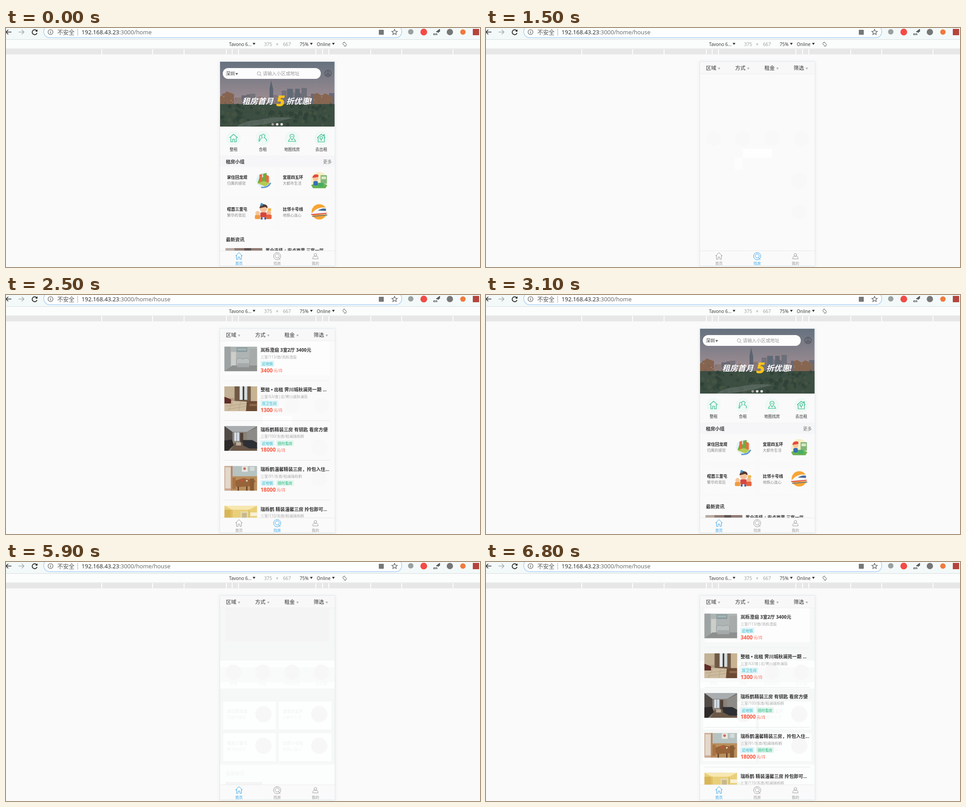
These frames come from a looping animation (1054x531 px, 8000 ms). An HTML page:

```html
<!DOCTYPE html>
<html lang="zh">
<head>
<meta charset="utf-8">
<style>
html, body { margin: 0; width: 100%; height: 100%; overflow: hidden; background: #fafafa; }
svg { display: block; width: 1054px; height: 531px; }
text { font-family: "Open Sans", "Noto Sans CJK SC", "Noto Sans CJK", sans-serif; white-space: pre; }
</style>
</head>
<body>
<svg id="stage" viewBox="0 0 1054 531" xmlns="http://www.w3.org/2000/svg"></svg>
<script>
const LOOP = 8000;
const GREEN = '#20b67f', BLUE = '#35a5ed', GREY = '#999';

const rect = (x, y, w, h, fill, extra = '') => `<rect x="${x}" y="${y}" width="${w}" height="${h}" fill="${fill}" ${extra}/>`;
const circle = (x, y, r, fill, extra = '') => `<circle cx="${x}" cy="${y}" r="${r}" fill="${fill}" ${extra}/>`;
const text = (x, y, size, fill, s, extra = '') => `<text x="${x}" y="${y}" font-size="${size}" fill="${fill}" ${extra}>${s}</text>`;
const line = (d, color, width = 1, extra = '') => `<path d="${d}" fill="none" stroke="${color}" stroke-width="${width}" ${extra}/>`;
const shape = (d, fill, extra = '') => `<path d="${d}" fill="${fill}" ${extra}/>`;
const group = (id, body, extra = '') => `<g id="${id}" ${extra}>${body}</g>`;
const down = (x, y, w, fill) => shape(`M${x} ${y}h${w}l${-w / 2} ${w * 0.8}z`, fill);
const BOLD = 'font-weight="700"', SEMI = 'font-weight="600"', MID = 'text-anchor="middle"';

function random(seed) {
  return () => (seed = (seed * 16807) % 2147483647) / 2147483647;
}

function browser() {
  let s = rect(0, 0, 1054, 25, '#f3f9f9') + rect(0, 25, 1054, 1, '#d9dcdd') + rect(0, 26, 1054, 20, '#fbfcfc');
  s += rect(84, -6, 796, 27.5, '#fdfefe', 'rx="13" stroke="#a9cff5" stroke-width="1.5"');
  s += line('M12 9H0M5 4L0 9L5 14', '#333', 1.7) + line('M28 9H40M35 4L40 9L35 14', '#a9adad', 1.6);
  s += line('M68 6A5.5 5.5 0 1 0 69 11', '#222', 1.8) + shape('M70 3v5h-5z', '#222');
  s += circle(99, 9, 5.5, 'none', 'stroke="#555" stroke-width="1.2"') + rect(98.4, 8, 1.3, 4, '#555') + rect(98.4, 5.7, 1.3, 1.3, '#555');
  s += text(114, 13.5, 12.8, '#555', '不安全') + rect(159, 2, 1, 15, '#aaa');
  s += '<text x="168" y="14" font-size="12.85" fill="#222">192.168.43.23<tspan fill="#666">:3000<tspan id="path"></tspan></tspan></text>';
  s += rect(829, 4, 11, 11, '#777', 'rx="1"');
  s += line('M864 3l1.8 4 4.3.4-3.2 2.9 1 4.2-3.9-2.3-3.9 2.3 1-4.2-3.2-2.9 4.3-.4z', '#555', 1.2);
  s += circle(900, 8.5, 6, '#9aa0a0') + circle(929, 9, 7.5, '#f34b45');
  s += text(950, 16, 7.5, '#333', 'en', BOLD) + line('M957 9L965 3M960 10L965 6', '#333', 2);
  s += circle(987, 9, 7, '#777') + circle(1016, 9, 6, '#f17a3c') + rect(1038, 2, 14, 14, '#b5443c');

  s += text(496, 39.5, 10, '#333', 'Tavono 6...') + down(548.5, 33, 6, '#333');
  s += text(574, 39.5, 10.2, GREY, '375') + text(600, 39.5, 10.2, GREY, '×') + text(616, 39.5, 10.2, GREY, '667');
  s += text(653, 39.5, 10, '#333', '75%') + down(676, 33, 6, '#333') + text(691, 39.5, 10, '#333', 'Online') + down(725, 33, 6, '#333');
  s += rect(750.5, 32, 5, 8, 'none', 'stroke="#777" rx="1" transform="rotate(-45 753 36)"') + line('M749 33a5 5 0 0 1 5-2M757 39a5 5 0 0 1-5 2', '#999');
  s += rect(0, 45.5, 1054, 1, '#dedfdf') + rect(0, 47, 1054, 11.5, '#e7e7e7');
  for (const x of [213, 326, 396, 490, 503, 517, 689, 704, 718, 811, 880, 994]) s += rect(x - 1, 47, 1.8, 11.5, '#fff');
  return s;
}

function skyline() {
  const rnd = random(71);
  let s = rect(476, 75, 255, 144, 'url(#sky)');
  for (let x = 476; x < 730;) {
    const w = 5 + rnd() * 10, h = 8 + rnd() * 22;
    s += rect(x, 172 - h, w, h, ['#77727a', '#83767a', '#686975', '#8c7a76'][rnd() * 4 | 0]);
    x += w;
  }
  s += shape('M586 172V135l2-12 2-7 1 7 3 12v37z', '#5b6470') + rect(613, 139, 11, 33, '#72727d') + rect(625, 135, 13, 37, '#606a78');
  s += rect(643, 135, 10, 37, '#606874') + rect(657, 133, 12, 39, '#6c7079');
  s += shape('M476 172v-19l15-12 16 6v25z', '#86644f') + shape('M683 173v-24l8-5 11 6 8-5 16 8v20z', '#866650');
  for (let i = 0; i < 42; i++) s += rect(478 + rnd() * 248, 150 + rnd() * 18, 1.5, 2, i % 2 ? '#b89f8c' : '#515966');
  s += rect(476, 169, 255, 50, '#3c4d41');
  for (let i = 0; i < 150; i++) {
    s += circle(477 + rnd() * 252, 171 + rnd() * 47, 2 + rnd() * 4, ['#33463a', '#3d5140', '#465543', '#2d4036'][i % 4], 'opacity=".8"');
  }
  s += shape('M560 204q45-9 78-4q-20 4-34 8t-66 11h-25q14-12 47-15z', '#68756f', 'opacity=".6"');
  const slogan = 'font-weight="900" font-style="italic"';
  s += text(525, 169, 17.4, '#fff', '租房首月', slogan) + text(601, 174, 33, '#fbc417', '5', slogan) + text(623, 169, 17.2, '#fff', '折优惠!', slogan);
  [593, 603, 613].forEach((x, i) => s += circle(x, 214, 2.8, i ? '#e5e7e5' : '#a99f9f'));
  return `<g clip-path="url(#hero)">${s}</g>`;
}

function search() {
  return rect(482, 89, 218, 24, '#fdfdfd', 'rx="12"') + text(489, 104.5, 9.8, '#333', '深圳') + down(510, 100, 6, '#666')
    + circle(562.5, 101, 3.8, 'none', 'stroke="#999"') + line('M565 104l3 3', GREY) + text(571, 105, 10.2, GREY, '请输入小区或地址')
    + circle(716, 101, 7.2, 'none', 'stroke="#484b55" stroke-width="1.2"') + circle(716, 99, 2.4, 'none', 'stroke="#484b55"') + line('M711 105l2-3q3 3 6 0l2 3z', '#484b55');
}

const NAV = [
  [506, '整租', 'M-9-1L0-9 9-1M-6-2V8H-2V2H2V8H6V-2'],
  [571, '合租', 'M-7 7q1-7 6-8q-4-6 2-8q7 2 2 8q6 1 5 8M-3-7q-5 0-4 5q-1 3-2 9'],
  [636, '地图找房', 'M0 4Q-9-8 0-9Q9-8 0 4ZM-2-4H2M-5 1L-8 7H8L5 1'],
  [701, '去出租', 'M-9-1L0-9 5-5V-8H7V-3L9-1M-7-2V8H7V-2M0 1V6M-3-1a3 3 0 1 0 6 0a3 3 0 1 0-6 0']
];

function art(kind, x, y) {
  let s = '';
  if (kind === 0) {
    s = circle(0, 0, 16, '#e2f0f5') + shape('M-13 6L-8-8l7 2v15zM-1 9v-23l8-2v25z', '#6dad42') + shape('M-9 6v-18l6-2v20zM6 8v-20l6 3v14z', '#e86d3b')
      + shape('M-14 7L1 2l13 5-10 7z', '#b4ca55') + line('M-5 16q15 2 21-10', '#609ad5', 3);
  } else if (kind === 1) {
    s = circle(0, 0, 18, '#f7efc5') + rect(3, -11, 14, 19, '#81b77a') + rect(5, -8, 10, 6, '#d9e9cb') + shape('M-18 11q18-9 36 0l-4 7h-28z', '#69b353')
      + circle(-8, -4, 6, '#f6c69e') + shape('M-15-5q1-10 13-7v5z', '#e54a3e') + rect(-13, 2, 10, 10, '#386fb4', 'rx="3"') + rect(-2, 6, 11, 9, '#45ad65');
  } else if (kind === 2) {
    s = circle(-13, 3, 5, '#f3c79c') + rect(-19, 7, 12, 9, '#f19b3d', 'rx="2"') + circle(12, 2, 5, '#f4b98c') + rect(6, 6, 12, 10, '#e5633f', 'rx="2"')
      + circle(0, -7, 8, '#f5c29b') + shape('M-9-8q2-10 10-9q9 1 8 9l-5-3z', '#573b32') + rect(-7, 1, 14, 11, '#d8453f', 'rx="3"')
      + rect(-6, 12, 4, 5, '#455a8b') + rect(2, 12, 4, 5, '#455a8b') + rect(-12, -17, 5, 6, '#4094d2', 'transform="rotate(20)"') + rect(10, -8, 7, 6, '#efb44d');
  } else {
    s = circle(0, 0, 17, '#f7a535') + shape('M-19 6Q-5-13 16-9q3 8-1 14z', '#f7f8fa') + shape('M-3-3Q6-9 15-7v5z', '#486a96')
      + line('M-18 6L16 3', '#da4545', 2) + line('M-16 10L18 7', '#6f7784', 2);
  }
  return `<g transform="translate(${x} ${y})">${s}</g>`;
}

const CELLS = [
  ['家住回龙观', '归属的感觉'], ['宜居四五环', '大都市生活'],
  ['喧嚣三里屯', '繁华的背后'], ['比邻十号线', '地铁心连心']
].map(([title, note], i) => ({ title, note, x: 482 + i % 2 * 124, y: 309 + (i >> 1) * 70.5 }));

function home() {
  const soft = rect(476, 219, 255, 276, '#fafafa') + rect(476, 285, 255, 23, '#f6f6f8') + rect(476, 284, 255, 1, '#f2f2f4')
    + CELLS.map(c => rect(c.x - .5, c.y, 119, 66, 'none', 'stroke="#f3f4f4" stroke-dasharray="3 2"')).join('');
  const crisp = rect(476, 219, 255, 276, '#fdfefe') + rect(505, 234, 226, 33, '#fafafa') + rect(476, 281, 255, 169, '#f4f5f6')
    + CELLS.map(c => rect(c.x, c.y, 119, 64.5, '#fefefe')).join('');
  let s = group('soft', soft) + group('crisp', crisp) + skyline() + search();
  for (const [x, label, d] of NAV) {
    s += circle(x, 245, 16, '#eff9f5') + line(d, GREEN, 1.2, `transform="translate(${x} 245)"`) + text(x, 273, 8.8, '#333', label, MID);
  }
  s += text(489, 301, 10.3, '#333', '租房小组', BOLD) + text(705, 301, 9.7, '#777', '更多');
  CELLS.forEach((c, i) => {
    s += text(c.x + 9.5, c.y + 26, 9, '#222', c.title, BOLD) + text(c.x + 9.5, c.y + 39, 8.3, '#888', c.note);
    s += art(i, c.x + 90.5, c.y + 29);
  });
  s += text(489, 474, 10.3, '#333', '最新资讯', BOLD) + rect(488, 489, 82, 6, '#8f7b75') + rect(488, 489, 20, 6, '#b8a9a2') + rect(530, 489, 15, 6, '#5e5352');
  return s + text(577, 498, 9.7, '#333', '置业选择 | 安贞西里 三室一厅', SEMI);
}

const HOUSES = [
  ['岚栎澄庭 3室2厅 3400元', '三室/113/南/岚栎澄庭', '近地铁', 3400],
  ['整租 • 出租 霁川城秋澜苑一期 ...', '三室/63/南|北/霁川城秋澜苑', '双卫生间', 1300],
  ['瑞栎鹤精装三房 有钥匙 看房方便', '三室/100/东南/柏澜瑞栎鹤', '近地铁 随时看房', 18000],
  ['瑞栎鹤温馨精装三房，拎包入住...', '三室/91/东南/柏澜瑞栎鹤', '近地铁 随时看房', 18000],
  ['瑞栎鹤 精装温馨三房 拎包即可...', '三室/110/东南/柏澜瑞栎鹤', '', 18000]
];
const START = [0, 3, 10, 0, 2];
const photoTop = i => 114.5 + i * 88.4;

const ROOMS = [
  rect(0, 0, 73, 55, '#aeb4b3') + shape('M0 0H14V48L0 55z', '#9da3a2') + rect(27, 2, 24, 10, '#87999b') + rect(29, 4, 20, 5, '#a3b4b5')
    + rect(15, 12, 11, 34, '#ccceca') + rect(56, 5, 17, 38, '#a7acab') + shape('M0 55L18 42H73V55z', '#8d908f')
    + shape('M27 42V28q7-4 14 0q8-4 15 0v14z', '#b9bfbf') + line('M27 43V28q7-4 14 0q8-4 15 0v15', '#8f9798') + rect(29, 37, 26, 9, '#a5a9a9'),
  rect(0, 0, 73, 55, '#b39b7e') + rect(0, 0, 22, 26, '#c3b296') + rect(23, 0, 36, 34, '#6f5a47') + rect(34, 0, 7, 30, '#e3e8ea') + rect(44, 0, 7, 30, '#d3dadd')
    + rect(41, 0, 3, 31, '#3f3630') + rect(59, 0, 14, 32, '#c7b291') + shape('M0 39L14 32 50 34 56 42 47 55H0z', '#cdbb9f') + line('M3 44L50 38M8 51L50 44M20 33L8 55M36 34L32 55', '#b6a184')
    + shape('M0 23l15 6v9H0z', '#5d2b26') + shape('M50 33H73V55H48z', '#6b4a34') + rect(56, 39, 17, 5, '#8c684a'),
  rect(0, 0, 73, 55, '#77716b') + shape('M0 0H73L50 13H18z', '#a9adb0') + shape('M0 0L18 13V42L0 55z', '#514b47') + rect(18, 13, 32, 27, '#8b8277')
    + rect(22, 14, 11, 19, '#d5dfe8') + rect(27, 14, 1, 19, '#6d6f70') + rect(35, 15, 7, 22, '#4d4038') + shape('M50 13L73 3V42H50z', '#8d8b87')
    + shape('M14 55L23 37H53L73 46V55z', '#6a5747') + shape('M40 31H62L73 37V50H56L42 43z', '#2e2f34') + shape('M0 32L17 30 21 42 8 55H0z', '#2d2928') + rect(26, 36, 11, 7, '#b9aa99'),
  rect(0, 0, 73, 55, '#b7c3c1') + rect(0, 0, 18, 55, '#cda88f') + rect(2, 3, 12, 47, '#e2d8ca') + rect(15, 0, 3, 55, '#b87f63') + rect(18, 23, 55, 32, '#b98f5d')
    + rect(39, 1, 13, 12, '#e8e8e2') + circle(45, 6, 3, '#c57464') + rect(57, 2, 10, 9, '#d5dcda') + shape('M20 34L42 27 70 33 60 45 27 47z', '#976439')
    + rect(18, 26, 7, 25, '#a9733f') + rect(57, 28, 9, 27, '#8a5a36') + line('M31 46v9M50 45v10', '#6b452c', 3) + circle(39, 32, 3, '#c6523b') + circle(50, 33, 2, '#e6d9bb'),
  rect(0, 0, 73, 55, '#e9cf78') + shape('M0 0H73L55 9H17z', '#f7e7b0') + rect(36, 13, 17, 42, '#e6d9ae') + rect(39, 16, 11, 39, '#c5b88d') + rect(0, 9, 15, 46, '#d8b558')
    + rect(58, 15, 15, 8, '#f7f1d9') + line('M17 9V55M55 9V55', '#c9a648')
];

function list() {
  let s = rect(486, 102, 234, 76, '#fdfdfd');
  HOUSES.forEach(([title, note, tags, price], i) => {
    const y = i * 88.4;
    s += `<g clip-path="url(#photo${i})"><g transform="translate(485.5 ${photoTop(i)})">${ROOMS[i]}</g></g>`;
    s += text(566, 126 + y, 10.3, '#333', title, BOLD) + text(566, 140.5 + y, 8.2, '#aaa', note);
    tags.split(' ').filter(Boolean).forEach((tag, k) => {
      const x = 566 + k * 35, w = tag.length * 8.2 + 6;
      s += rect(x, 146 + y, w, 13, k ? '#e1f5ed' : '#e0f4f7', 'rx="1"') + text(x + 3, 156 + y, 8.2, k ? '#2bb984' : '#2fb7c9', tag);
    });
    s += text(566, 171.5 + y, 11.8, '#fa5741', price, BOLD) + text(price > 9999 ? 602 : 595.5, 171 + y, 8.2, '#fa5741', '元/月');
    s += rect(486, 190 + y, 234, 1, i ? '#e6e7e7' : '#f1f1f1');
  });
  return s;
}

function house() {
  // Faint remains of the previous page behind the list.
  const rounds = fill => NAV.map(n => circle(n[0], 245, 17, fill)).join('');
  const faint = rect(476, 102, 255, 393, '#fafafa') + rounds('#f8f8f8') + circle(696, 339, 18, '#f8f8f8') + circle(696, 409, 17, '#f8f8f8')
    + rect(571, 268, 65, 20, '#fefefe') + rect(553, 288, 18, 27, '#fdfdfd');
  let strong = rect(476, 102, 255, 393, '#f6f7f7') + rect(488, 102, 230, 74, '#f4f4f4') + rect(476, 219, 255, 62, '#fdfefe') + rect(476, 234, 255, 33, '#f9fafa') + rounds('#f7f7f7')
    + rect(476, 450, 255, 45, '#fcfdfd') + NAV.map(n => text(n[0], 273, 8.8, '#f4f5f5', n[1], MID)).join('');
  for (const c of CELLS) {
    strong += rect(c.x + 1, c.y + 1, 117, 62, '#fdfefe') + circle(c.x + 90.5, c.y + 29, 18, '#f7f7f7')
      + text(c.x + 9.5, c.y + 26, 9, '#f3f4f4', c.title, BOLD) + text(c.x + 9.5, c.y + 39, 8.3, '#f3f4f4', c.note);
  }
  strong += text(489, 474, 10.3, '#f5f6f6', '最新资讯', BOLD) + rect(488, 489, 82, 6, '#f4f4f4');
  let s = group('faint', faint) + group('strong', strong) + group('list', list()) + rect(726, 105, 2, 2, '#aaa', 'id="thumb"');
  s += rect(476, 75, 255, 27, '#f8f8f8') + rect(476, 101.5, 255, 1, '#f0f0f0');
  ['区域', '方式', '租金', '筛选'].forEach((label, i) => {
    s += text(489 + i * 65, 93, 11.6, '#333', label) + down(515.5 + i * 65, 88, 5.5, '#b3b3b3');
  });
  return s;
}

const TABS = [
  [518, '首页', 'M-8 0L0-8 8 0M-5.5-2V7H-2V2H2V7H5.5V-2'],
  [603, '找房', 'M-8 0a8 8 0 1 0 16 0a8 8 0 1 0-16 0M-4.5-.5a4.5 4.5 0 1 0 9 0a4.5 4.5 0 1 0-9 0M3 3L7 8'],
  [688, '我的', 'M-3-3a3 3 0 1 0 6 0a3 3 0 1 0-6 0M-6 6q0-6 4-6h4q4 0 4 6z']
];

function tabs() {
  return rect(476, 495, 255, 33, '#fafafa') + rect(476, 494.5, 255, 1, '#ebecec') + TABS.map(([x, label, d], i) =>
    `<g id="tab${i}" color="#999">${line(d, 'currentColor', 1, `transform="translate(${x} 507)"`)}${text(x, 526, 8.3, 'currentColor', label, MID)}</g>`).join('');
}

const clip = (id, x, y, w, h) => `<clipPath id="${id}">${rect(x, y, w, h, '#000')}</clipPath>`;
const stage = document.getElementById('stage');
stage.innerHTML = `<defs>
  <linearGradient id="sky" x1="0" y1="0" x2="0" y2="1"><stop stop-color="#65717f"/><stop offset=".3" stop-color="#827f89"/><stop offset=".65" stop-color="#a18e93"/></linearGradient>
  <filter id="blur"><feGaussianBlur stdDeviation="3"/></filter>
  ${clip('screen', 476, 75, 255, 420)}${clip('hero', 476, 75, 254.5, 144)}
  ${ROOMS.map((_, i) => clip('photo' + i, 485.5, photoTop(i), 73, 55)).join('')}
  </defs>` + rect(0, 0, 1054, 531, '#fafafa') + rect(474, 74, 259, 456, '#e9edee', 'filter="url(#blur)"') + browser()
  + rect(475.5, 74.5, 256, 454, '#fafafa', 'stroke="#e2eaed"')
  + `<g clip-path="url(#screen)">${group('home', home())}${group('house', house())}</g>` + tabs();

const $ = id => document.getElementById(id);
const show = (id, on) => $(id).setAttribute('visibility', on ? 'inherit' : 'hidden');
const within = (t, a, b) => t >= a && t < b;

function render(t) {
  const atHome = t < 1500 || within(t, 3100, 5900);
  const crisp = within(t, 3200, 5900);
  const second = t >= 5900;
  $('path').textContent = t < 1400 || within(t, 3000, 5900) ? '/home' : '/home/house';
  show('home', atHome);
  show('house', !atHome);
  show('soft', atHome && !crisp);
  show('crisp', crisp);
  show('faint', !atHome && !second);
  show('strong', second);
  show('list', within(t, 2000, 3100) || t >= 6300);
  show('thumb', within(t, 2000, 2500) || within(t, 6300, 6800));
  $('thumb').setAttribute('opacity', within(t, 6600, 6700) ? 0.66 : within(t, 6700, 6800) ? 0.33 : 1);

  const loaded = second ? 1 : Math.min(1, Math.max(0, Math.floor((t - 2000) / 100) / 5));
  START.forEach((h, i) => $('photo' + i).firstChild.setAttribute('height', h + (55 - h) * loaded));
  const active = within(t, 1500, 3100) ? 1 : 0;
  TABS.forEach((_, i) => $('tab' + i).setAttribute('color', i === active ? BLUE : GREY));
}

const begin = performance.now();
function tick() {
  render((performance.now() - begin) % LOOP);
  requestAnimationFrame(tick);
}
tick();
</script>
</body>
</html>
```
